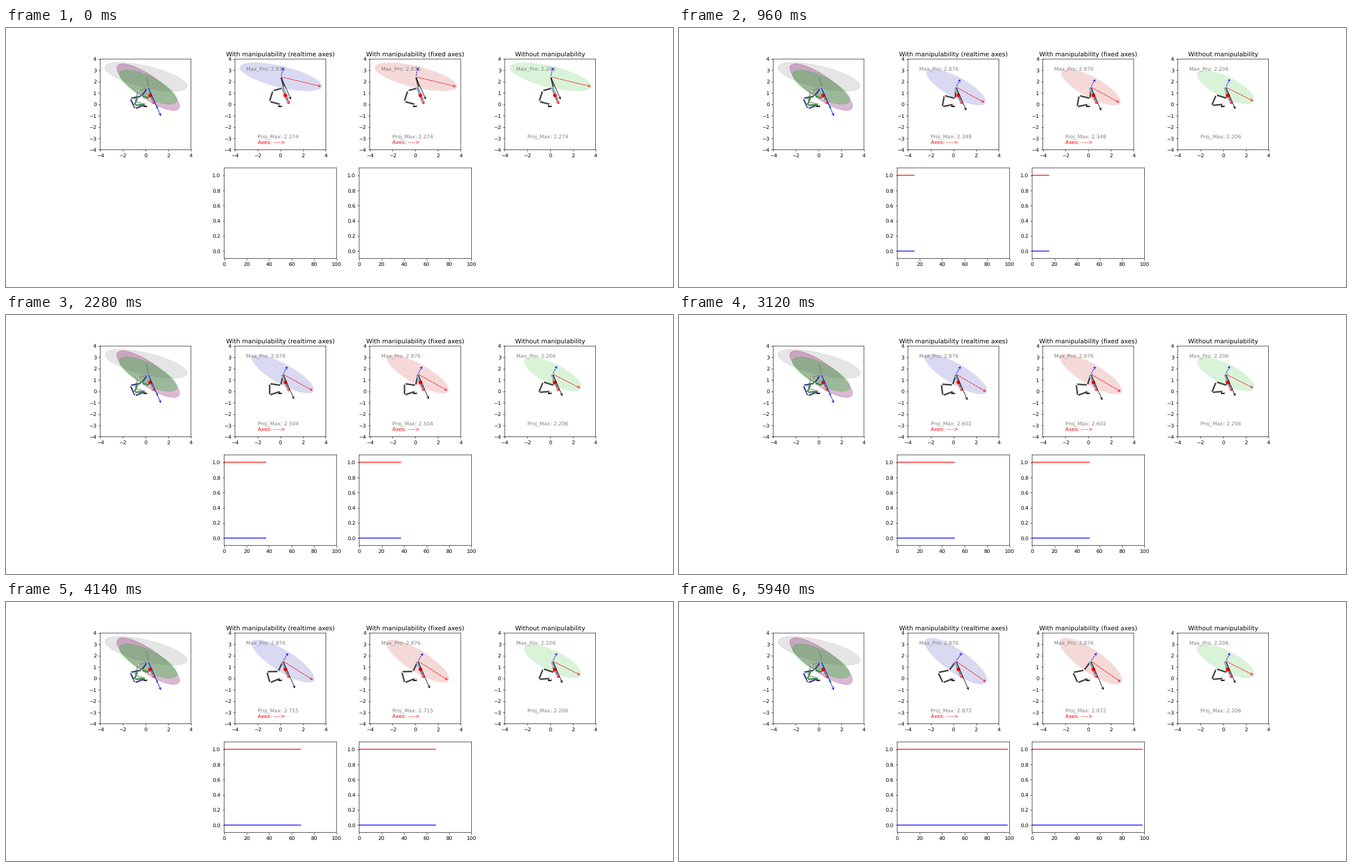
A matplotlib script for the animation above (6000 ms loop, 1200 by 467 pixels).

```python
import numpy as np
import matplotlib.pyplot as plt
from matplotlib.animation import FuncAnimation
from matplotlib.patches import Ellipse, Rectangle

plt.rcParams['text.hinting'] = 'no_hinting'
plt.rcParams['path.snap'] = False

DPI = 200 / 3
FRAMES = 100
REACH = 14.5                      # frame at which the hand arrives
START = np.array([0.05, 2.435])
GOAL = np.array([0.23, 1.525])
AIM = np.radians(-66.3)
AIM_DIR = np.array([np.cos(AIM), np.sin(AIM)])

# frame, first link angle, second link angle, projection
TUNED = np.array([
    (0, 165, 72, 2.274), (8, 180, 75.6, 2.32), (14.5, 190.5, 79.3, 2.339),
    (16, 191.7, 80, 2.348), (38, 198.6, 90, 2.504), (52, 200.7, 97.3, 2.602),
    (69, 202, 105.3, 2.715), (99, 202.3, 115, 2.872)])
PLAIN = np.array([
    (0, 165, 72, 2.274), (8, 179, 72.5, 2.251),
    (11.5, 182.5, 70.5, 2.231), (14.5, 185, 67.5, 2.206)])


def pose(keys, k):
    """Joint positions, hand last, and the projected length."""
    a1, a2, proj = (np.interp(k, keys[:, 0], keys[:, i]) for i in (1, 2, 3))
    a1, a2 = np.radians([a1, a2])
    hand = START + (GOAL - START) * min(k / REACH, 1)
    p1 = np.array([np.cos(a1), np.sin(a1)])
    p2 = p1 + [np.cos(a2), np.sin(a2)]
    gap = hand - p2
    dist = np.hypot(*gap)
    side = np.array([gap[1], -gap[0]]) / dist
    p3 = p2 + gap / 2 + side * np.sqrt(max(1 - dist**2 / 4, 0))
    return np.array([(0, 0), p1, p2, p3, hand]), proj


def main_axes(pts):
    """Half axes of the velocity ellipse, long one first."""
    d = pts[-1] - pts[:-1]
    jac = np.array([-d[:, 1], d[:, 0]])
    val, vec = np.linalg.eigh(jac @ jac.T)
    short, long = vec[:, 0], vec[:, 1]
    long = long * np.sign(long[0]) * np.sqrt(val[1])
    short = short * np.sign(short[1]) * np.sqrt(val[0])
    return long, short


def add_ellipse(ax, pts, color, alpha, lw=1):
    long, short = main_axes(pts)
    angle = np.degrees(np.arctan2(long[1], long[0]))
    return ax.add_patch(Ellipse(
        pts[-1], 2 * np.hypot(*long), 2 * np.hypot(*short), angle=angle,
        color=color, alpha=alpha, lw=lw, zorder=1))


def add_arm(ax, pts, color, alpha=1):
    """Bars that stop short of the white joints."""
    arts = []
    for a, b in zip(pts[:-1], pts[1:]):
        ends = np.array([a + 0.07 * (b - a), b - 0.07 * (b - a)]).T
        arts += ax.plot(*ends, color=color, lw=3, alpha=alpha,
                        solid_capstyle='butt', zorder=2)
    arts += ax.plot(pts[:-1, 0], pts[:-1, 1], 'o', ms=2.8, mfc='white',
                    mec='#d8d8d8', mew=0.3, alpha=alpha, zorder=2.1)
    return arts


def add_arrow(ax, tail, vec, color, style='-'):
    return ax.annotate('', xy=tail + vec, xytext=tail, zorder=3,
                       arrowprops=dict(arrowstyle='->', color=color,
                                       linestyle=style))


def add_tool(ax):
    top, tip = np.array([0.18, 1.5]), np.array([0.74, 0.08])
    for share, color, lw in ((1, '#e3a0ac', 6.2), (0.97, '#d9d3dc', 3.6),
                             (0.82, '#5fb0cc', 3.2)):
        ends = np.array([top, top + share * (tip - top)]).T
        ax.plot(*ends, color=color, lw=lw, solid_capstyle='butt', zorder=2.3)
    dot = np.array([0.41, 0.83])
    add_arrow(ax, dot, np.array([0.83, -0.08]) - dot, 'red', '--')
    ax.plot(*dot, 'o', color='red', ms=6, zorder=2.5)
    ax.add_patch(Rectangle((-0.19, -0.23), 0.32, 0.13, color='black', lw=0,
                           zorder=2))
    ax.plot(0, 0, 'o', ms=4, mfc='white', mec='#d9a9a9', mew=0.6, zorder=2.4)


fig, grid = plt.subplots(2, 4, figsize=(1200.01 / DPI, 467.01 / DPI), dpi=DPI)
for ax in grid[0]:
    ax.set(xlim=(-4, 4), ylim=(-4, 4), aspect='equal',
           xticks=range(-4, 5, 2), yticks=range(-4, 5))
    add_tool(ax)
for ax in grid[1, 1:3]:
    ax.set(xlim=(0, 100), ylim=(-0.1, 1.1), xticks=range(0, 101, 20),
           yticks=np.arange(6) / 5)
grid[1, 0].axis('off')
grid[1, 3].axis('off')

# overview of the start and the two end poses
view = grid[0, 0]
first, _ = pose(TUNED, 0)
tuned, _ = pose(TUNED, 99)
plain, _ = pose(PLAIN, 99)
add_ellipse(view, first, 'gray', 0.2)
add_ellipse(view, tuned, (0.5, 0, 0.4), 0.28)
add_ellipse(view, plain, (0.05, 0.72, 0.08), 0.3)
add_arm(view, first, 'gray', 0.55)
add_arm(view, tuned, '#44448c')
add_arm(view, plain, '#3c8c3c')
add_arrow(view, GOAL, 2.206 * AIM_DIR, 'green')
add_arrow(view, GOAL, 2.876 * AIM_DIR, 'blue')

PANELS = [
    (grid[0, 1], 'With manipulability (realtime axes)', TUNED, (0, 0, 0.67), 2.876),
    (grid[0, 2], 'With manipulability (fixed axes)', TUNED, (0.75, 0, 0), 2.876),
    (grid[0, 3], 'Without manipulability', PLAIN, (0, 0.7, 0), 2.206)]
labels = []
for ax, title, keys, color, best in PANELS:
    ax.set_title(title)
    ax.text(-3, 3, f'Max_Pro: {best}', color='gray')
    labels.append(ax.text(-2, -3, '', color='gray'))
    if keys is TUNED:
        ax.text(-2, -3.5, 'Axes: ---->', color='red')

lines = [(ax.plot([], [], color=c)[0], y)
         for ax in grid[1, 1:3] for y, c in ((1.002, 'red'), (-0.002, 'blue'))]
moving = []


def update(k):
    while moving:
        moving.pop().remove()
    for (ax, _, keys, color, _), label in zip(PANELS, labels):
        pts, proj = pose(keys, k)
        long, short = main_axes(pts)
        hand = pts[-1]
        moving.append(add_ellipse(ax, pts, color, 0.15, lw=0))
        moving.extend(add_arm(ax, pts, '#464646'))
        moving.append(add_arrow(ax, hand, long, 'red', '--'))
        moving.append(add_arrow(ax, hand, short, 'blue', '--'))
        moving.append(add_arrow(ax, hand, proj * AIM_DIR, 'black'))
        label.set_text(f'Proj_Max: {round(float(proj), 3)}')
    for line, y in lines:
        line.set_data(np.arange(k), np.full(k, y))
    return moving


anim = FuncAnimation(fig, update, frames=FRAMES, interval=60, repeat=True,
                     repeat_delay=0, blit=False)
plt.show()
```
